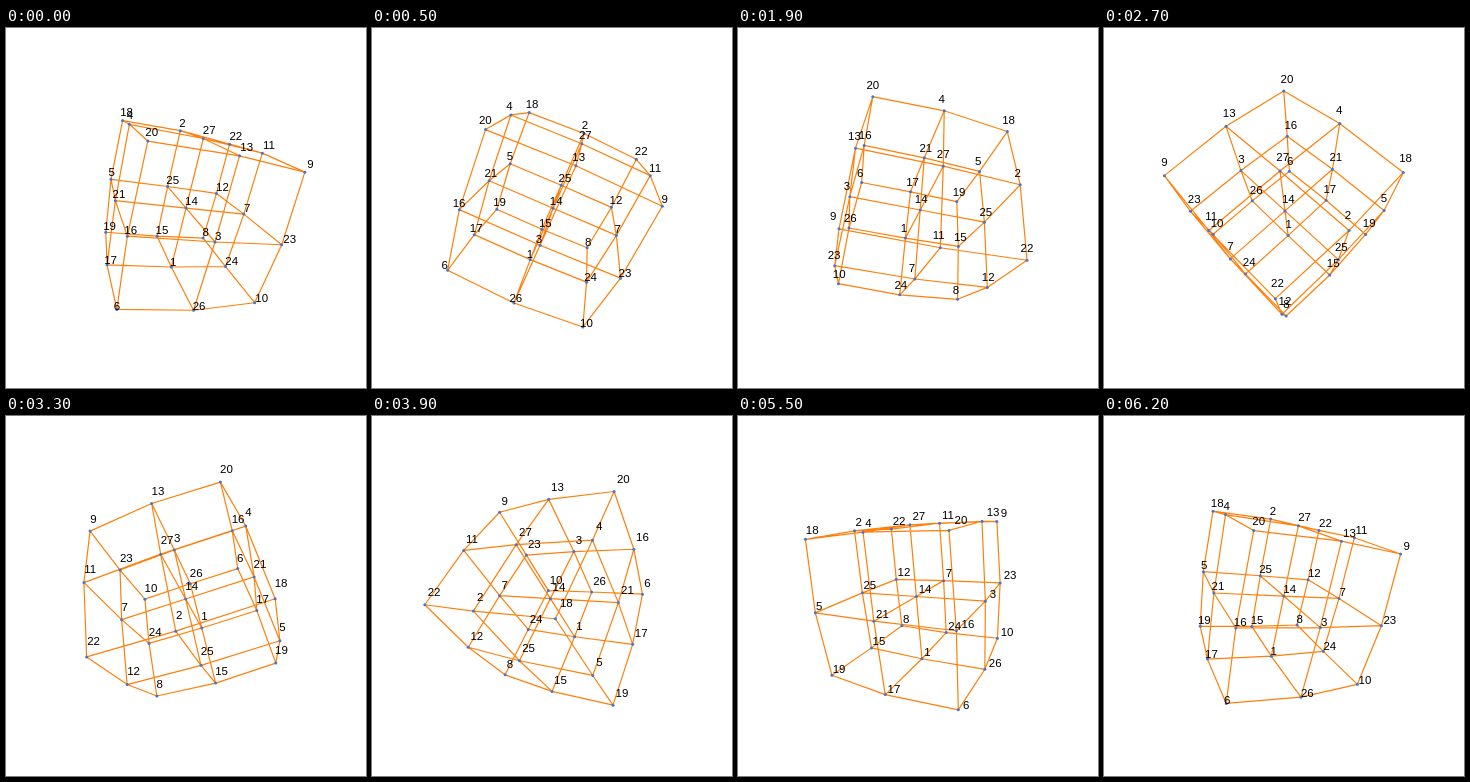
An HTML page that plays this animation: 360x360 px, repeating every 6300 ms.

```html
<!DOCTYPE html>
<html lang="en">
<head>
<meta charset="utf-8">
<title>Rotating magic cube</title>
<style>
  html, body { margin: 0; width: 100%; height: 100%; overflow: hidden; background: #fff; }
  svg { display: block; width: 100vw; height: 100vh; }
  path { fill: none; stroke: #ff7f0a; stroke-width: 1.2; }
  circle { fill: #4376d0; }
  text { font: 11.5px "Liberation Sans", Arial, sans-serif; fill: #000; }
</style>
</head>
<body>
<svg viewBox="0 0 360 360"><path/></svg>
<script>
const LOOP = 6300, STEP = 100;
const MID = 180, DIST = 266;
const COS = 0.772, SIN = 0.636; // camera elevation

// Half-edge vectors of the tilted cube: right, towards the viewer, up
const AXES = [[60.4, -15.4, -20.9], [21.4, 59.6, 16.7], [-15.1, 22.5, -60]];
const SHIFT = [0, 2.35, 2]; // points sit at -SHIFT, labels at +SHIFT
const BULGE = [1, 1.065, 1.04, 1]; // centre, faces, edges, corners

const NUMBERS = [
  18, 5, 19,  4, 21, 17,  20, 16, 6,
  2, 25, 15,  27, 14, 1,  13, 3, 26,
  22, 12, 8,  11, 7, 24,  9, 23, 10
];

const svg = document.querySelector('svg');
const grid = document.querySelector('path');

function add(tag, attrs = {}) {
  const el = document.createElementNS('http://www.w3.org/2000/svg', tag);
  for (const key in attrs) el.setAttribute(key, attrs[key]);
  return svg.appendChild(el);
}

const nodes = NUMBERS.map((n, i) => {
  const cell = [Math.floor(i / 9) - 1, Math.floor(i / 3) % 3 - 1, i % 3 - 1];
  const bulge = BULGE[cell.filter(Boolean).length];
  const at = sign => SHIFT.map((s, k) =>
    sign * s + bulge * cell.reduce((sum, c, j) => sum + c * AXES[j][k], 0));
  return { point: at(-1), anchor: at(1), dot: add('circle', { r: 1.5 }) };
});
nodes.forEach((node, i) => {
  node.label = add('text');
  node.label.textContent = NUMBERS[i];
});

// Each grid line runs through three nodes
const lines = [];
for (const stride of [9, 3, 1])
  for (let i = 0; i < 27; i++)
    if (Math.floor(i / stride) % 3 === 0) lines.push([i, i + stride, i + 2 * stride]);

function project([x, q, z], angle) {
  const c = Math.cos(angle), s = Math.sin(angle);
  const right = x * c - q * s, near = q * c + x * s;
  const scale = DIST / (DIST - near * COS - z * SIN);
  return [MID + right * scale, MID + (near * SIN - z * COS) * scale];
}

function draw(now) {
  const angle = Math.floor(now % LOOP / STEP) * STEP / LOOP * 2 * Math.PI;
  const spots = nodes.map(({ point, anchor, dot, label }) => {
    const [x, y] = project(point, angle);
    const [tx, ty] = project(anchor, angle);
    dot.setAttribute('cx', x);
    dot.setAttribute('cy', y);
    label.setAttribute('x', tx - 1);
    label.setAttribute('y', ty - 2.5);
    return [x, y];
  });
  grid.setAttribute('d', lines.map(line => 'M' + line.map(i => spots[i]).join('L')).join(''));
}

const start = performance.now();
function tick() {
  draw(performance.now() - start);
  requestAnimationFrame(tick);
}
tick();
</script>
</body>
</html>
```
